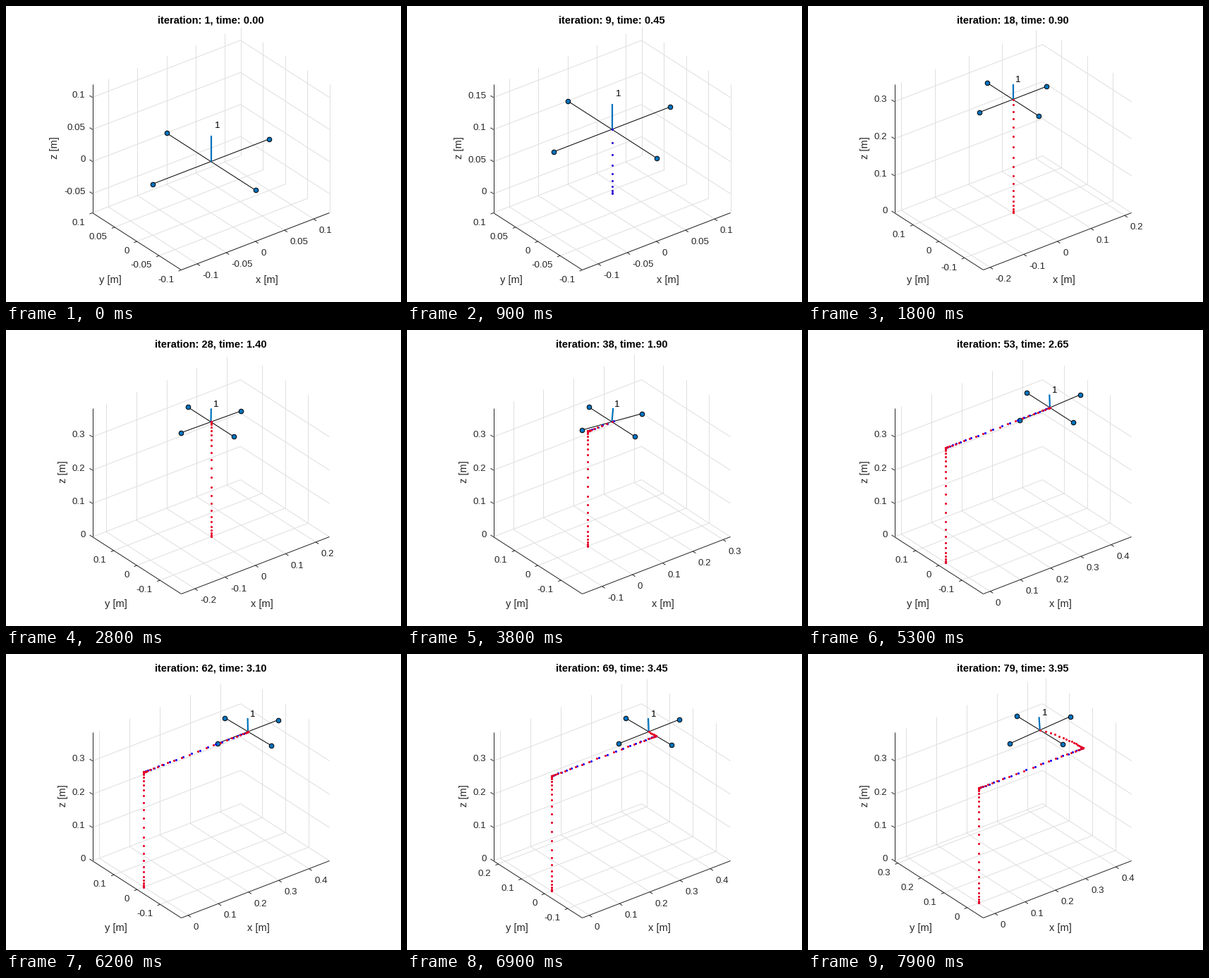
These frames come from a looping animation (560 px wide and 420 px high, 8 s). A matplotlib script:

```python
import numpy as np
import matplotlib.pyplot as plt
from matplotlib.animation import FuncAnimation
from matplotlib.collections import LineCollection

W, H, DPI = 560, 420, 100
FRAMES, STEP, DT = 80, 100, 0.05
PX = 72 / DPI
INK, GRID, BLUE = "#262626", "#dfdfdf", "#0072bd"

# Projected box: front corner and the three edge vectors
CORNER = np.array([248.0, 374.0])
EDGES = np.array([[210.0, -81.0], [-126.0, -81.0], [0.0, -182.0]])
RATIO = np.array([1.2725, 1.0, 1.0])

REACH, LEG, ARM, MAST, G = 0.345, 1.18, 0.1, 0.04, 9.81


def ramp(t):
    """Constant acceleration, then constant deceleration."""
    u = np.clip(t / LEG, 0, 1)
    return np.where(u < 0.5, 2 * u**2, 1 - 2 * (1 - u) ** 2)


def route(t):
    """Climb, slide along x, then swing round a circle."""
    angle = 0.000668 * (np.maximum(t - 3, 0) / DT) ** 2.2
    r = REACH * ramp(t - 1.5)
    return np.column_stack([r * np.cos(angle), r * np.sin(angle), REACH * ramp(t)])


times = np.arange(FRAMES + 10) * DT
path = route(times)
planned = route(times + 0.0125)
accel = np.gradient(np.gradient(path, DT, axis=0), DT, axis=0)
tilt = np.column_stack(
    [np.convolve(accel[:, i], np.ones(3) / 3, "same") for i in (0, 1)]) / G
tilt = np.roll(tilt, -1, axis=0)


def craft(k):
    """Arm tips (+x, -x, +y, -y) and mast tip."""
    a, b = tilt[k]
    ex = np.array([1, 0, -a]) / np.hypot(1, a) * ARM
    ey = np.array([0, 1, -b]) / np.hypot(1, b) * ARM
    ez = np.array([a, b, 1]) / np.sqrt(1 + a * a + b * b) * MAST
    return path[k] + np.array([ex, -ex, ey, -ey, ez])


def limits(points):
    """Tight bounds widened about their centre to equal units."""
    lo, hi = points.min(axis=0), points.max(axis=0)
    size = ((hi - lo) / RATIO).max()
    mid = (lo + hi) / 2
    return mid - size * RATIO / 2, size


def ticks(lo, span):
    step = 0.1 if span > 0.3 else 0.05
    first = np.ceil(lo / step - 1e-6)
    last = np.floor((lo + span) / step + 1e-6)
    return np.arange(first, last + 1) * step


def name(v):
    return f"{round(v, 2) + 0.0:g}"


def width(s):
    """Approximate tick label width in pixels."""
    return 13.33 * sum({"-": 0.333, ".": 0.278}.get(c, 0.556) for c in s)


fig = plt.figure(figsize=(W / DPI, H / DPI), dpi=DPI, facecolor="white")
ax = fig.add_axes([0, 0, 1, 1])
plt.rcParams["font.family"] = "Liberation Sans"


def write(x, y, s, size=13.33, ha="center", color=INK, **kw):
    ax.text(x, y + 0.35 * size, s, fontsize=size * PX, ha=ha, va="baseline",
            color=color, **kw)


def lines(segments, color, width_px=1):
    ax.add_collection(LineCollection(segments, colors=color,
                                     linewidths=width_px * PX))


def dots(xy, color):
    ax.plot(xy[:, 0], xy[:, 1], "o", ms=3.1 * PX, mew=0, color=color)


def box(u):
    return CORNER + np.asarray(u, float) @ EDGES


def draw_axes(lo, span):
    marks = [ticks(lo[i], span[i]) for i in range(3)]
    unit = [(marks[i] - lo[i]) / span[i] for i in range(3)]
    grid = []
    for u in unit[0]:
        grid += [box([(u, 0, 0), (u, 1, 0)]), box([(u, 1, 0), (u, 1, 1)])]
    for v in unit[1]:
        grid += [box([(0, v, 0), (1, v, 0)]), box([(1, v, 0), (1, v, 1)])]
    for w in unit[2]:
        grid += [box([(0, 1, w), (1, 1, w)]), box([(1, 1, w), (1, 0, w)])]
    lines(grid, GRID)

    edges = [box([(0, 0, 0), (1, 0, 0)]), box([(0, 0, 0), (0, 1, 0)]),
             box([(0, 1, 0), (0, 1, 1)])]
    spots = [box([(u, 0, 0) for u in unit[0]]), box([(0, v, 0) for v in unit[1]]),
             box([(0, 1, w) for w in unit[2]])]
    outward = [(4, 2.6), (-4, 1.6), (-4, -2.6)]
    offset = [(7.5, 15.5), (-10.5, 12.5), (-10, -4)]
    widest = []
    for i in range(3):
        names = [name(v) for v in marks[i]]
        widest.append(max(map(width, names)))
        for p, s in zip(spots[i], names):
            edges.append([p, p + outward[i]])
            write(*(p + offset[i]), s, ha="right" if i else "left")
    lines(edges, INK)

    write(339 + widest[0], 387.5, "x [m]", 14.67)
    write(178 - widest[1], 387.5, "y [m]", 14.67)
    ax.text(99 - widest[2], 201, "z [m]", fontsize=14.67 * PX, color=INK,
            rotation=90, ha="center", va="center")


def draw(k):
    ax.clear()
    ax.set_axis_off()
    ax.set_xlim(-0.5, W - 0.5)
    ax.set_ylim(H - 0.5, -0.5)

    body = craft(k)
    trail = path[:k + 1]
    lo, size = limits(np.vstack([trail, body]))
    span = size * RATIO
    draw_axes(lo, span)

    def project(p):
        return box((p - lo) / span)

    tips, hub = project(body), project(path[k])
    lines([tips[:2], tips[2:4]], "black")
    lines([[hub, tips[4]]], BLUE, 2.2)
    ax.plot(tips[:4, 0], tips[:4, 1], "o", ms=6.6 * PX, mfc=BLUE, mec="black",
            mew=PX)
    write(hub[0] + 4.7 + 0.956 / size, hub[1] + 3 - 11 / size, "1", color="black")

    if k:
        slide = [i for i in range(k + 1) if 30 < i < 54]
        if slide:
            dots(project(planned[slide]), "#1000f5")
        dots(project(trail), "#3000d0" if k < 12 else "#e60026")

    write(290, 19, f"iteration: {max(k, 1)}, time: {k * DT:.2f}", 14.67,
          color="black", weight="bold")
    return []


anim = FuncAnimation(fig, draw, frames=FRAMES, init_func=lambda: [],
                     interval=STEP, repeat=True, repeat_delay=0)
plt.show()
```
